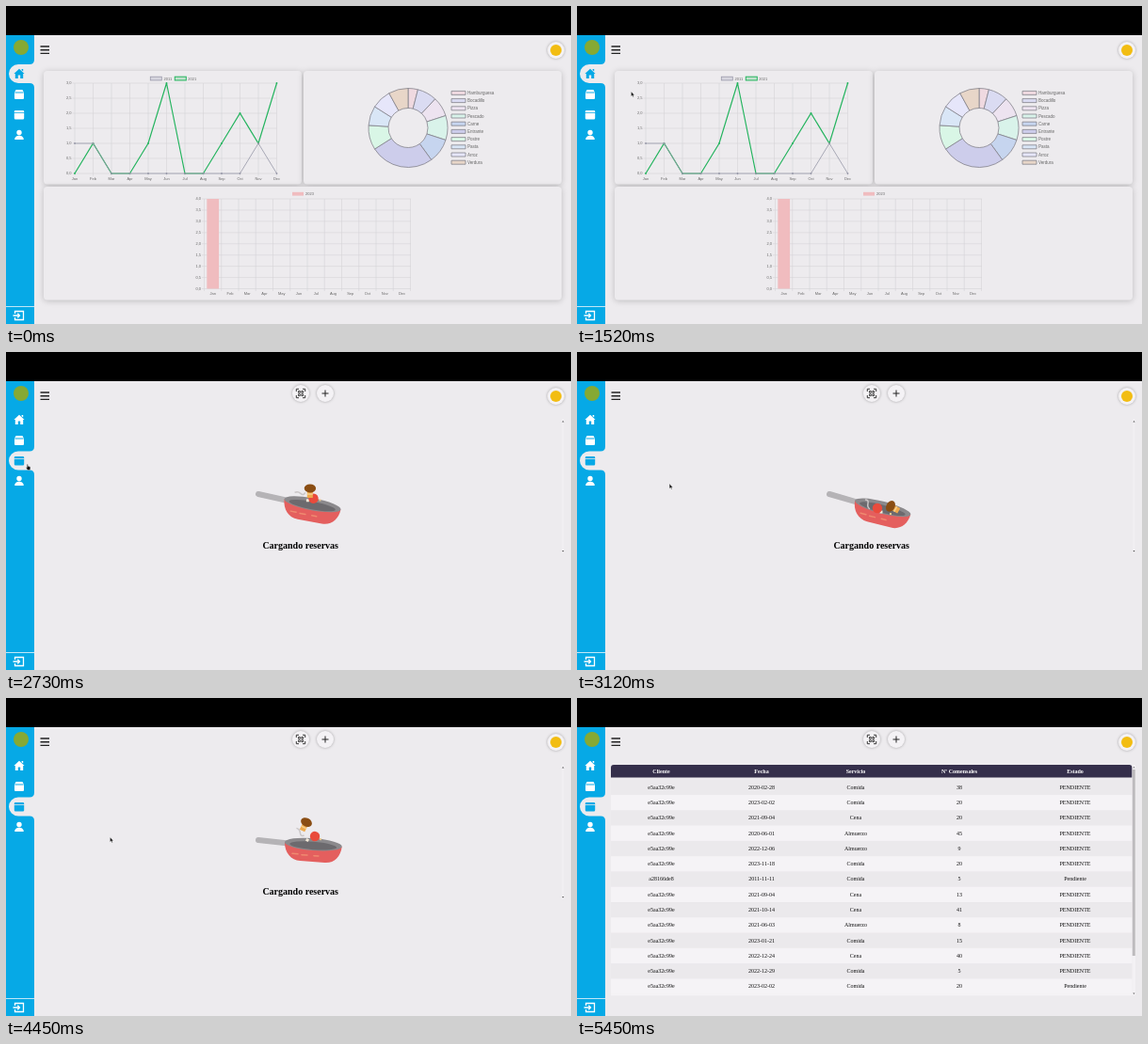
Animation of 600x338 px, one loop 6240 ms. Source, as an HTML page:

```html
<!DOCTYPE html>
<html lang="es">
<head>
<meta charset="utf-8">
<style>
html, body { margin: 0; width: 100%; height: 100%; overflow: hidden; background: #edebee; }
svg { display: block; }
.chart { font: 4px "Liberation Sans", sans-serif; fill: #666; }
.table { font: 6px "Liberation Serif", serif; fill: #111; text-anchor: middle; }
.bold { font-weight: bold; }
.card { fill: #edebee; filter: drop-shadow(0 1px 3px rgba(0,0,0,.2)); }
.button { fill: #f4f2f5; filter: drop-shadow(0 .5px 1.5px rgba(0,0,0,.3)); }
.line { fill: none; stroke: #222; }
</style>
</head>
<body>
<svg id="stage" width="600" height="338" viewBox="0 0 600 338"></svg>
<script>
const LOOP = 6240, OPEN = 2640, LOADED = 4800, TOSS = 1850;
const BLUE = [6, 169, 230];
const $ = id => document.getElementById(id);
const range = (n, f) => Array.from({ length: n }, (_, i) => f(i)).join('');
const text = (x, y, s, attrs = '') => `<text x="${x}" y="${y}" ${attrs}>${s}</text>`;
const rect = (x, y, w, h, fill, attrs = '') =>
  `<rect x="${x}" y="${y}" width="${w}" height="${h}" fill="${fill}" ${attrs}/>`;
const path = (d, attrs = '') => `<path d="${d}" ${attrs}/>`;
const middle = 'text-anchor="middle"', end = 'text-anchor="end"';
const months = 'Jan Feb Mar Apr May Jun Jul Aug Sep Oct Nov Dec'.split(' ');

// Grid with value labels every 0.5 and month labels below
function axes(x0, x1, top, base, max, columns, labelX, step) {
  const half = (base - top) / max / 2;
  let d = '', labels = '';
  for (let i = 0; i <= max * 2; i++) {
    const y = base - i * half;
    d += `M${x0 - 2.5} ${y}H${x1}`;
    labels += text(x0 - 3.5, y + 1.4, (i / 2).toFixed(1).replace('.', ','), end);
  }
  for (let i = 0; i <= columns; i++) d += `M${x0 + i * step} ${top}V${base + 2.5}`;
  months.forEach((m, i) => labels += text(labelX + i * step, base + 6.8, m, middle));
  return path(d, 'stroke="#d5d3d7" stroke-width=".6"') + labels;
}

function lineChart() {
  const series = (values, color, width) => {
    const points = values.map((v, i) => [73 + i * 19.5, 178 - v * 32]);
    return `<polyline points="${points}" fill="none" stroke="${color}" stroke-width="${width}"/>` +
      points.map(([x, y]) => `<circle cx="${x}" cy="${y}" r=".9" fill="${color}"/>`).join('');
  };
  return axes(73, 287.5, 82, 178, 3, 11, 73, 19.5) +
    rect(153.3, 75.2, 12, 3.8, '#d6d5de', 'stroke="#9a9aaa" stroke-width=".8"') + text(167.5, 78.5, '2011') +
    rect(179.3, 75.2, 12, 3.8, '#bfe0cc', 'stroke="#25b45f" stroke-width="1"') + text(193.3, 78.5, '2021') +
    series([0, 1, 0, 0, 1, 3, 0, 0, 1, 2, 1, 3], '#25b45f', 1.2) +
    series([1, 1, 0, 0, 0, 0, 0, 0, 0, 0, 1, 0], '#9697a8', .8);
}

function donut() {
  const slices = [
    ['Hamburguesa', 2, '#efd9e0'], ['Bocadillo', 4, '#dadbf2'], ['Pizza', 4, '#ede3f0'],
    ['Pescado', 5, '#d9f3ea'], ['Carne', 5, '#c6d5ef'], ['Entrante', 13, '#cdcdeb'],
    ['Postre', 5, '#d9f6e6'], ['Pasta', 4, '#d9e6f6'], ['Arroz', 4, '#e6e6fa'], ['Verdura', 4, '#e8d6c8']];
  const at = (r, part) => {
    const a = part / 50 * 2 * Math.PI;
    return `${427 + r * Math.sin(a)} ${129.5 - r * Math.cos(a)}`;
  };
  let sum = 0;
  return slices.map(([name, n, color], i) => {
    const a = sum, b = sum += n, y = 90.4 + i * 8.2;
    const ink = `fill="${color}" stroke="#85838c" stroke-width=".8"`;
    return path(`M${at(42, a)}A42 42 0 0 1 ${at(42, b)}L${at(21, b)}A21 21 0 0 0 ${at(21, a)}Z`, ink) +
      path(`M473 ${y}h15v4h-15z`, ink) + text(490, y + 3.6, name, 'font-size="4.5"');
  }).join('');
}

const barChart = () =>
  axes(210.5, 430, 205, 300.5, 4, 12, 219.7, 18.25) +
  rect(213.3, 205, 12.8, 95.5, '#f0bcbf') +
  rect(304, 197.8, 12, 3.8, '#f0bcbf') + text(318, 201.2, '2023');

function table() {
  const columns = [89.5, 196, 296, 406, 529];
  const rows = `2020-02-28 Comida 38,2023-02-02 Comida 20,2021-09-04 Cena 20,2020-06-01 Almuerzo 45,
    2022-12-06 Almuerzo 9,2023-11-18 Comida 20,2011-11-11 Comida 5,2021-09-04 Cena 13,2021-10-14 Cena 41,
    2021-06-03 Almuerzo 8,2023-01-21 Comida 15,2022-12-24 Cena 40,2022-12-29 Comida 5,2023-02-02 Comida 20`;
  const line = (cells, y, attrs) => cells.map((c, i) => text(columns[i], y, c, attrs)).join('');
  return path('M36 84.5V74q0-3 3-3H586.5q3 0 3 3v10.5z', 'fill="#352f4b"') +
    line(['Cliente', 'Fecha', 'Servicio', 'Nº Comensales', 'Estado'], 80, 'class="bold" fill="#fff"') +
    rows.split(',').map((row, i) => {
      const y = 86.8 + i * 16.28;
      const client = i == 6 ? 'a28166de8' : 'e5aa32c99e';
      const state = i == 6 || i == 13 ? 'Pendiente' : 'PENDIENTE';
      return rect(36, y, 553.5, 16.28, i % 2 ? '#f5f3f6' : '#ebe9ec') +
        line([client, ...row.trim().split(' '), state], y + 10);
    }).join('') +
    rect(36, 314.7, 553.5, 1.5, '#f5f3f6') +
    rect(589.7, 71, 3.3, 245, '#f3f1f4') + rect(589.8, 76, 3, 198, '#bdbbbe') +
    path('M590.4 74.3h2l-1-1.4zM590.4 313.5h2l-1 1.4z', 'fill="#555"');
}

const nav = [
  [72, 'M0-5.2 5.6 0H4.2V5H1.2V1.6H-1.2V5H-4.2V0H-5.6ZM2.6-5H4.2V-2.4L2.6-3.8Z'],
  [94, 'M-3.4-5H3.4L5-2.2V4Q5 5 4 5H-4Q-5 5-5 4V-2.2ZM-4.6-2.4H4.6v.8H-4.6Z'],
  [115.5, 'M-4-4.6H4Q5.2-4.6 5.2-3.4V3.8Q5.2 5 4 5H-4Q-5.2 5-5.2 3.8V-3.4Q-5.2-4.6-4-4.6ZM-5.2-2.3H5.2v.8H-5.2Z'],
  [137, 'M0-5.2a2.7 2.7 0 0 1 0 5.4a2.7 2.7 0 0 1 0-5.4ZM-4.8 5C-4.8-.6 4.8-.6 4.8 5Z']];

const sidebar = () =>
  rect(0, 31, 30, 307, `rgb(${BLUE})`) +
  '<circle cx="16" cy="44" r="8" fill="#86a934"/>' +
  nav.map(([y, icon], i) =>
    path(`M30 ${y - 15}q0 5-5 5H13a10 10 0 0 0 0 20H25q5 0 5 5z`, `id="tab${i}" fill="#edebee"`) +
    path(icon, `id="icon${i}" fill-rule="evenodd" transform="translate(14 ${y})"`)).join('') +
  rect(0, 319, 30, .9, '#d5effa') +
  path('M9.5 327v-2.5h9v9h-9V331M7.5 329h7M12.3 326.8l2.2 2.2-2.2 2.2', 'fill="none" stroke="#fff" stroke-width="1.3"');

const toolbar = () =>
  '<circle class="button" cx="313" cy="44" r="9"/><circle class="button" cx="339" cy="44" r="9"/>' +
  path('M308.3 42v-2.700h2.700M315 39.300h2.700V42M317.700 46v2.700H315M311 48.700h-2.700V46', 'class="line" stroke-width=".9"') +
  path('M310.500 41.500h1.800v1.800h-1.800zM313.800 41.500h1.800v1.800h-1.800zM310.500 44.800h1.800v1.800h-1.800zM313.800 44.800h1.800v1.800h-1.800z',
    'class="line" stroke-width=".8"') +
  path('M335.500 44h7M339 40.500v7', 'class="line" stroke-width="1"');

const loader = () =>
  `<g id="pan">
    <path d="M0 0 30 1" stroke="#b5b3b6" stroke-width="6" stroke-linecap="round"/>
    <path d="M28 0C29 11 36 18.500 46 18.500H72C82 18.500 88.500 11 89 0Z" fill="#e45f5e"/>
    <ellipse cx="58.500" cy="0" rx="30.500" ry="6.500" fill="#8b898c"/>
    <ellipse cx="58.500" cy="1.400" rx="25" ry="4.200" fill="#6c6a6e"/>
    <path d="M37 11.500h6M47 12h6M60 12h5" stroke="#ef8a70" stroke-width="1.500" stroke-linecap="round"/>
  </g>
  <path id="food2" d="M-2-5q4 0 3 4t2 6" fill="none" stroke="#c9c5c6" stroke-width="1.500"/>
  <rect id="food3" x="-1.500" y="-1.500" width="3" height="3" fill="#f3e9d8"/>
  <rect id="food4" x="-1" y="-1" width="2" height="2" fill="#ecc98c"/>
  <circle id="food1" r="5.200" fill="#e94b3c"/>
  <g id="food0">
    <path d="M0-3H10V3H0Z" fill="#eeaa4c"/><path d="M6-3V3" stroke="#f6cf8e" stroke-width="1.500"/>
    <ellipse rx="4.500" ry="6.200" fill="#8a4d13"/>
  </g>` +
  text(312.700, 209, 'Cargando reservas', `class="bold" style="font:bold 10px 'Liberation Serif',serif" ${middle}`) +
  rect(590.300, 71, 2, 143, '#f1eff2') +
  path('M590.500 74.500h2l-1-1.400zM590.500 211h2l-1 1.400z', 'fill="#444"');

$('stage').innerHTML =
  rect(0, 0, 600, 338, '#edebee') + rect(0, 0, 600, 31, '#000') + sidebar() +
  path('M36.500 43H46M36.500 46.700H46M36.500 50.400H46', 'class="line" stroke-width="1.400"') +
  '<circle class="button" cx="584" cy="47" r="9"/><circle cx="584" cy="47" r="6" fill="#f2bd13"/>' +
  `<g id="dashboard" class="chart">
    ${rect(40, 69, 274, 120.500, '', 'rx="4" class="card"')}
    ${rect(316, 69, 274, 120.500, '', 'rx="4" class="card"')}
    ${rect(40, 192, 550, 120.500, '', 'rx="4" class="card"')}
    ${lineChart()}${donut()}${barChart()}
  </g>
  <g id="toolbar">${toolbar()}</g>
  <g id="loader">${loader()}</g>
  <g id="table" class="table">${table()}</g>
  <path id="arrow" d="M0 0V5L1.200 4 2 5.800 2.800 5.400 2 3.800H3.500Z" fill="#111" stroke="#fff" stroke-width=".3"/>
  <path id="hand" d="M0 0q.8-.4 1 .4v1.600l2.500.6V5L3 6.200H.6L-1 3.600l.5-.4.500.4Z" fill="#111" stroke="#fff" stroke-width=".3"/>`;

// Keys: time since the start of a toss, x, y, rotation
const foods = [
  [[0, 333, 164, 30], [300, 330, 138, -80], [670, 324, 103, -188], [950, 319, 101, -215], [1330, 319, 132, -243], [1600, 328, 157, -300]],
  [[0, 319, 166, 0], [300, 314, 145, -80], [670, 311, 123, -140], [950, 317, 120, -200], [1330, 328, 147, -260], [1600, 323, 163, -310]],
  [[0, 308, 162, 0], [670, 307, 111, -10], [1330, 313, 142, -200]],
  [[0, 323, 170, 0], [670, 323, 119, -120], [1330, 320, 151, -240]],
  [[0, 333, 172, 0], [670, 338, 119, -120], [1330, 334, 150, -240]]];
const cursorPath = [
  [1300, 483, 110], [1500, 57.500, 91], [1900, 57.500, 91], [2070, 20, 93], [2220, 21, 119],
  [2700, 21, 119], [3100, 98, 140], [3400, 110.500, 148]];

const clamp = v => Math.max(0, Math.min(1, v));
const ramp = (t, a, b) => clamp((t - a) / (b - a));
const show = (id, on) => $(id).style.display = on ? '' : 'none';

// Smooth closed curve through the keys; one turn per toss
function tossed(keys, u) {
  const n = keys.length, turn = [TOSS, 0, 0, -360];
  const key = i => keys[(i + n) % n].map((v, c) => v + Math.floor(i / n) * turn[c]);
  let i = n - 1;
  while (keys[i][0] > u) i--;
  const [a, b, c, d] = [i - 1, i, i + 1, i + 2].map(key);
  const h = c[0] - b[0], s = (u - b[0]) / h;
  return [1, 2, 3].map(k => {
    const m0 = (c[k] - a[k]) / (c[0] - a[0]) * h, m1 = (d[k] - b[k]) / (d[0] - b[0]) * h;
    return b[k] + s * (m0 + s * (3 * (c[k] - b[k]) - 2 * m0 - m1 + s * (2 * (b[k] - c[k]) + m0 + m1)));
  });
}

function cursorAt(t) {
  let i = 0;
  while (i < cursorPath.length - 2 && cursorPath[i + 1][0] < t) i++;
  const [t0, x0, y0] = cursorPath[i], [t1, x1, y1] = cursorPath[i + 1];
  const s = ramp(t, t0, t1), e = s * s * (3 - 2 * s);
  return [x0 + (x1 - x0) * e, y0 + (y1 - y0) * e];
}

function draw(t) {
  show('dashboard', t < OPEN);
  show('toolbar', t >= OPEN);
  show('loader', t >= OPEN && t < LOADED);
  show('table', t >= LOADED);

  const lit = [
    t < OPEN ? 1 : 0,
    Math.min(ramp(t, 2030, 2110), 1 - ramp(t, 2260, 2380)),
    ramp(t, 2150, 2230),
    0];
  lit.forEach((v, i) => {
    $('tab' + i).style.opacity = v;
    $('icon' + i).style.fill = `rgb(${BLUE.map(c => Math.round(255 + (c - 255) * v))})`;
  });

  $('pan').setAttribute('transform',
    `translate(268 151) rotate(${16 * Math.cos(2 * Math.PI * (t - 2980) / TOSS)})`);
  const u = (t - 3120 + 2 * TOSS) % TOSS;
  foods.forEach((keys, i) => {
    const [x, y, r] = tossed(keys, u);
    $('food' + i).setAttribute('transform', `translate(${x} ${y}) rotate(${r})`);
  });

  const [x, y] = cursorAt(t), pointing = x < 28;
  for (const id of ['arrow', 'hand']) $(id).setAttribute('transform', `translate(${x} ${y})`);
  show('arrow', t >= 1300 && t < LOADED && !pointing);
  show('hand', t >= 1300 && pointing);
}

function frame() {
  draw(performance.now() % LOOP);
  requestAnimationFrame(frame);
}
frame();
</script>
</body>
</html>
```
